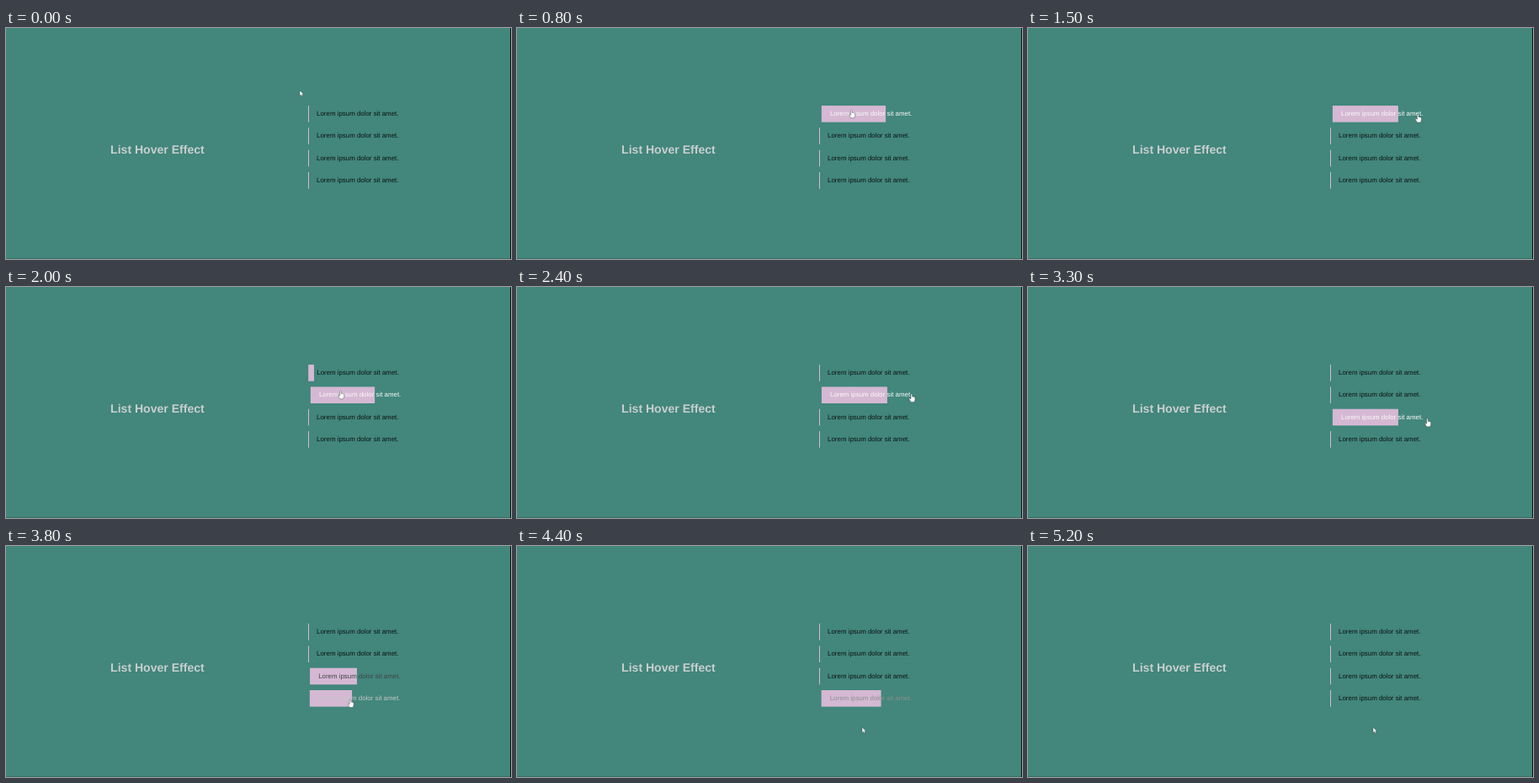
These frames come from a looping animation (600x274 px, 6.2 s). An HTML page:

```html
<!DOCTYPE html>
<html lang="en">
<head>
<meta charset="utf-8">
<title>List Hover Effect</title>
<style>
  html, body { margin: 0; width: 100%; height: 100%; overflow: hidden; background: #42867c; }
  svg { display: block; width: 600px; height: 274px; }
  text { font-family: "Liberation Sans", Arial, sans-serif; text-rendering: geometricPrecision; }
  .title { font-size: 14.05px; font-weight: bold; fill: #c8cfcf; }
  .item text { font-size: 7.9px; }
  .item rect { fill: #d5b8d3; }
  #cursor path { fill: #fff; stroke: #26302f; stroke-width: .4; stroke-linejoin: round; }
</style>
</head>
<body>
<svg viewBox="0 0 600 274">
  <rect width="600" height="274" fill="#42867c"/>
  <rect y="273" width="600" height="1" fill="#356f66"/>
  <rect x="599" width="1" height="274" fill="#0a1211"/>
  <text class="title" x="124.1" y="149.2">List Hover Effect</text>
  <g id="list"></g>
  <g id="cursor">
    <path id="arrow" d="M0 0V6.6L1.6 5.2L2.7 7.6L3.8 7.1L2.8 4.8H4.8Z"/>
    <path id="hand" d="M-.8 .8Q0 -.6 .9 .8V3.6L2 3.4L3 3.8L4.2 4.2V7.2L3.2 9.8H-.8L-3 6Q-2.6 4.8 -.8 6.2Z"/>
  </g>
</svg>
<script>
  const LOOP = 6200, STEP = 100;
  const SLIDE = 520, FADE = 400;          // transition lengths in ms
  const REST = 1, FULL = 78, SHIFT = 2.9; // bar widths and item offset
  const SWEEP = 68;                       // how far the pointer swings right

  // times at which the pointer crosses into the next row; the last one leaves the list
  const crossings = [380, 1580, 2575, 3607, 4290];

  // pointer stops: time, x, y
  const stops = [
    [200, 349, 74], [800, 397.5, 97], [2000, 397.5, 123],
    [2800, 404, 152.3], [3800, 409, 181.6], [4300, 410, 215]
  ];

  const mix = (a, b, k) => a + (b - a) * k;
  const clamp = k => Math.min(1, Math.max(0, k));

  function bezier(x1, y1, x2, y2) {
    const at = (a, b, u) => 3 * a * u * (1 - u) ** 2 + 3 * b * u * u * (1 - u) + u ** 3;
    return x => {
      let lo = 0, hi = 1;
      for (let i = 0; i < 20; i++) {
        const mid = (lo + hi) / 2;
        if (at(x1, x2, mid) < clamp(x)) lo = mid; else hi = mid;
      }
      return at(y1, y2, lo);
    };
  }
  const ease = bezier(.25, .1, .25, 1);
  const easeInOut = bezier(.42, 0, .58, 1);

  const byId = id => document.getElementById(id);
  function add(parent, name, attrs) {
    const el = document.createElementNS("http://www.w3.org/2000/svg", name);
    for (const key in attrs) el.setAttribute(key, attrs[key]);
    return parent.appendChild(el);
  }

  const items = crossings.slice(0, -1).map((enter, i) => {
    const top = 92.1 + i * 26.3;
    const group = add(byId("list"), "g", { class: "item" });
    const bar = add(group, "rect", { x: 359, y: top, height: 19.6 });
    const label = add(group, "text", { x: 369.1, y: top + 12 });
    label.textContent = "Lorem ipsum dolor sit amet.";
    return { enter, leave: crossings[i + 1], group, bar, label };
  });

  function drawItem({ enter, leave, group, bar, label }, t) {
    const left = t >= leave;
    const age = t - (left ? leave : enter);
    const open = left ? 1 - easeInOut(age / SLIDE) : ease(age / SLIDE);
    const tint = left ? 1 - ease(age / FADE) : ease(age / FADE);
    const color = [11, 20, 19].map(v => Math.round(mix(v, 250, tint)));
    bar.setAttribute("width", mix(REST, FULL, open));
    group.setAttribute("transform", `translate(${SHIFT * open} 0)`);
    label.setAttribute("fill", `rgb(${color})`);
  }

  // between rows the pointer swings right and back, dropping late
  function pointer(t) {
    const last = stops.length - 1;
    const next = stops.findIndex(s => s[0] > t);
    const i = next < 0 ? last : Math.max(1, next);
    const [t0, x0, y0] = stops[i - 1], [t1, x1, y1] = stops[i];
    const k = clamp((t - t0) / (t1 - t0));
    const swing = i > 1 && i < last ? SWEEP * Math.sin(Math.PI * k) : 0;
    return [mix(x0, x1, k) + swing, mix(y0, y1, k ** 3)];
  }

  function draw(t) {
    items.forEach(item => drawItem(item, t));
    const over = items.some(({ enter, leave }) => t >= enter && t < leave);
    byId("cursor").setAttribute("transform", `translate(${pointer(t)})`);
    byId("hand").style.display = over ? "" : "none";
    byId("arrow").style.display = over ? "none" : "";
  }

  const start = performance.now();
  function tick() {
    const t = (performance.now() - start) % LOOP;
    draw(Math.floor(t / STEP) * STEP);
    requestAnimationFrame(tick);
  }
  tick();
</script>
</body>
</html>
```
